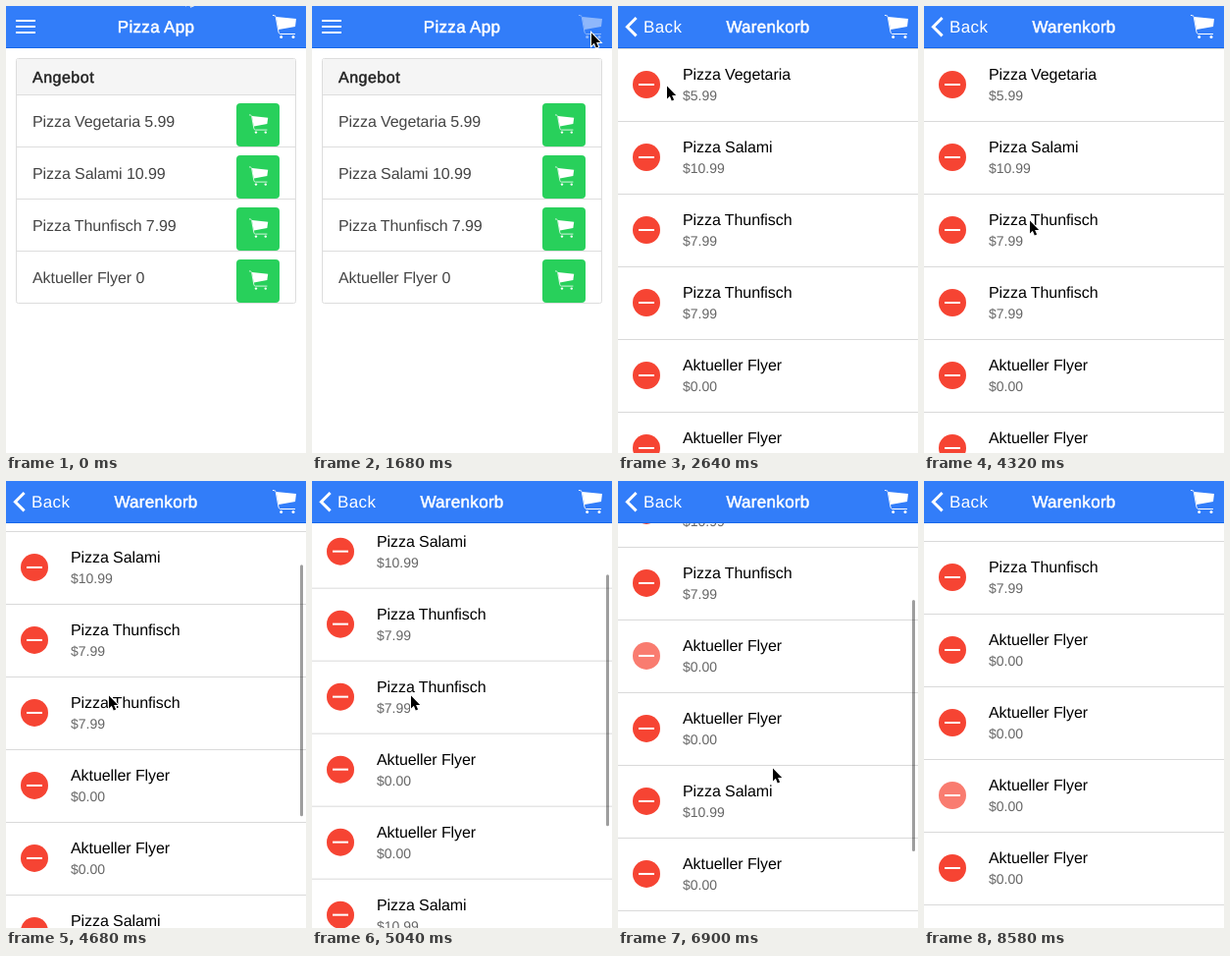
Write an HTML page that moves like this. It is 306 px wide and 455 px high and loops after 9300 ms.

```html
<!DOCTYPE html>
<html lang="de">
<head>
<meta charset="utf-8">
<title>Pizza App</title>
<style>
html, body { margin: 0; width: 100%; height: 100%; overflow: hidden; background: #fff; }
svg { display: block; font-family: "Liberation Sans", Arial, sans-serif; font-size: 16px; letter-spacing: -.08px; text-rendering: geometricPrecision; }
.title { font-size: 17px; fill: #fff; stroke: #fff; stroke-width: .5; text-anchor: middle; letter-spacing: .3px; }
.head { fill: #222; stroke: #222; stroke-width: .5; letter-spacing: .5px; }
.back { font-size: 17px; fill: #fff; letter-spacing: .4px; }
.offer { fill: #444; }
.price { font-size: 14px; fill: #666; letter-spacing: 0; }
</style>
</head>
<body>
<svg width="306" height="455" viewBox="0 0 306 455">
  <defs>
    <g id="cart" fill="#fff">
      <path d="M0 .5C2.2 .5 3 1 3.3 2.4L6 17.4C6.3 18.8 7 19.5 8 19.5H23" fill="none" stroke="#fff"/>
      <path d="M3.6 2L24 4L23 12L6 15Z"/>
      <circle cx="8.7" cy="22.6" r="1.5"/>
      <circle cx="21" cy="22.6" r="1.5"/>
    </g>
  </defs>
  <rect width="306" height="455" fill="#fff"/>
  <g id="shop">
    <rect x="10.5" y="53.5" width="285" height="249" rx="2" fill="#fff" stroke="#ddd"/>
    <rect x="11" y="54" width="284" height="36" fill="#f5f5f5"/>
    <text x="27" y="78" class="head">Angebot</text>
  </g>
  <g id="basket">
    <rect x="-1" y="43" width="1" height="412" fill="#000" opacity=".2"/>
    <rect y="43" width="306" height="412" fill="#fff"/>
    <g id="list"><rect y="43" width="306" height="1" fill="#d9d9d9"/></g>
    <rect id="bar" x="300" width="3" height="256" rx="1.5" fill="#000" opacity="0"/>
  </g>
  <rect width="306" height="43" fill="#327df9"/>
  <rect y="42" width="306" height="1" fill="#1767ea"/>
  <path id="menu" d="M10 15H30M10 21H30M10 27H30" stroke="#fff" stroke-width="2"/>
  <text id="title1" class="title" y="27">Pizza App</text>
  <text id="title2" class="title" y="27">Warenkorb</text>
  <path id="arrow" d="M18.6 12L9.4 21.2L18.6 30.4" fill="none" stroke="#fff" stroke-width="3"/>
  <text id="back" class="back" x="26" y="27">Back</text>
  <use id="topCart" href="#cart" x="272" y="9"/>
  <path id="cursor" d="M0 -.5V12.5L2.9 9.7L4.8 14.4L7.1 13.4L5.1 8.9H9.2Z" stroke="#fff" stroke-width="2" paint-order="stroke"/>
</svg>
<script>
const LOOP = 9300, STEP = 60, ROW = 74, TOP = 43;
const $ = id => document.getElementById(id);

function add(parent, tag, attrs, text) {
  const el = document.createElementNS("http://www.w3.org/2000/svg", tag);
  set(el, attrs);
  if (text) el.textContent = text;
  return parent.appendChild(el);
}
function set(el, attrs) {
  for (const k in attrs) el.setAttribute(k, attrs[k]);
}
const move = (el, x, y) => set(el, { transform: `translate(${x} ${y})` });
const clamp = v => Math.max(0, Math.min(1, v));
const part = (t, a, b) => clamp((t - a) / (b - a));
const out = (u, n) => 1 - (1 - u) ** n;
const smooth = u => u * u * (3 - 2 * u);

const menu = {
  V: ["Pizza Vegetaria", "5.99"],
  S: ["Pizza Salami", "10.99"],
  T: ["Pizza Thunfisch", "7.99"],
  F: ["Aktueller Flyer", "0.00"]
};

["Pizza Vegetaria 5.99", "Pizza Salami 10.99", "Pizza Thunfisch 7.99", "Aktueller Flyer 0"].forEach((s, i) => {
  const y = 90 + i * 53, shop = $("shop");
  add(shop, "rect", { x: 11, y, width: 284, height: 1, fill: "#ddd" });
  add(shop, "text", { x: 27, y: y + 33, class: "offer" }, s);
  add(shop, "rect", { x: 235, y: y + 9, width: 44, height: 44, rx: 4, fill: "#28d05b" });
  add(shop, "use", { href: "#cart", transform: `translate(248 ${y + 20.5}) scale(.8)` });
});

const rows = Array.from({ length: 9 }, (_, i) => {
  const g = add($("list"), "g", { transform: `translate(0 ${TOP + i * ROW})` });
  const dot = add(g, "circle", { cx: 29, cy: 37, r: 14, fill: "#f64433" });
  add(g, "rect", { x: 21, y: 36, width: 16, height: 2, fill: "#fff" });
  const name = add(g, "text", { x: 66, y: 32 });
  const price = add(g, "text", { x: 66, y: 53, class: "price" });
  add(g, "rect", { y: ROW, width: 306, height: 1, fill: "#d9d9d9" });
  return { g, dot, name, price };
});

// pointer path: time, x, y
const path = [
  [0, 184, -14], [180, 184, -14], [660, 284, 36], [780, 285, 28],
  [1860, 285, 28], [2580, 62, 80], [2640, 50, 82], [3120, 50, 82],
  [3300, 36, 150], [3540, 65, 253], [3660, 65, 253], [3960, 66, 170],
  [4140, 66, 170], [4320, 108, 219], [4380, 108, 219], [5040, 101, 219],
  [5100, 101, 219], [5700, 30, 219], [5940, 30, 219], [6360, 150, 285],
  [6480, 150, 285], [6900, 158, 293], [7080, 158, 293], [7440, 32, 318],
  [7860, 32, 318], [8100, 98, 53], [8280, 98, 53], [8580, 122, -22], [LOOP, 122, -22]
];

function pointer(t) {
  const i = path.findIndex(k => k[0] > t);
  const a = path[i - 1], b = path[i];
  const u = smooth(part(t, a[0], b[0]));
  return [a[1] + (b[1] - a[1]) * u, a[2] + (b[2] - a[2]) * u];
}

function barAlpha(t) {
  if (t < 4440 || t > 5400 && t < 6540) return 0;
  return .38 * (1 - (t < 6000 ? part(t, 5100, 5400) : part(t, 7440, 7740)));
}

function drawList(t) {
  const items = [..."VSTTFFSFF"];
  if (t >= 5940) items.splice(3, 1);
  if (t >= 7740) items.splice(5, 1);
  const pressed = t < 5700 ? -1 : t < 7560 ? 3 : 5;
  rows.forEach((r, i) => {
    const item = menu[items[i]];
    set(r.g, { visibility: item ? "inherit" : "hidden" });
    if (!item) return;
    r.name.textContent = item[0];
    r.price.textContent = "$" + item[1];
    set(r.dot, { opacity: i === pressed ? .7 : 1 });
  });
  const scroll = 82.4 * out(part(t, 4380, 5100), 3) + 47.6 * out(part(t, 6480, 7320), 3);
  move($("list"), 0, -scroll);
  set($("bar"), { y: TOP + 1.3 + scroll * 412 / 666, opacity: barAlpha(t) });
}

function draw(t) {
  const p = out(part(t, 1740, 2340), 3.5), q = 1 - p;
  move($("shop"), -101 * p, 0);
  set($("shop"), { opacity: 1 - .1 * p });
  move($("basket"), 306 * q, 0);
  set($("basket"), { visibility: p > 0 ? "visible" : "hidden" });
  set($("menu"), { opacity: q });
  set($("title1"), { x: 153 - 107 * p, opacity: q });
  set($("title2"), { x: 153 + 100 * q, opacity: p });
  set($("arrow"), { opacity: p });
  set($("back"), { x: 26 + 80 * q, opacity: p });
  set($("topCart"), { opacity: t < 1680 ? 1 : .45 + .55 * p });
  drawList(t);
  move($("cursor"), ...pointer(t));
}

const start = performance.now();
function tick() {
  const t = (performance.now() - start) % LOOP;
  draw(Math.floor(t / STEP) * STEP);
  requestAnimationFrame(tick);
}
tick();
</script>
</body>
</html>
```
